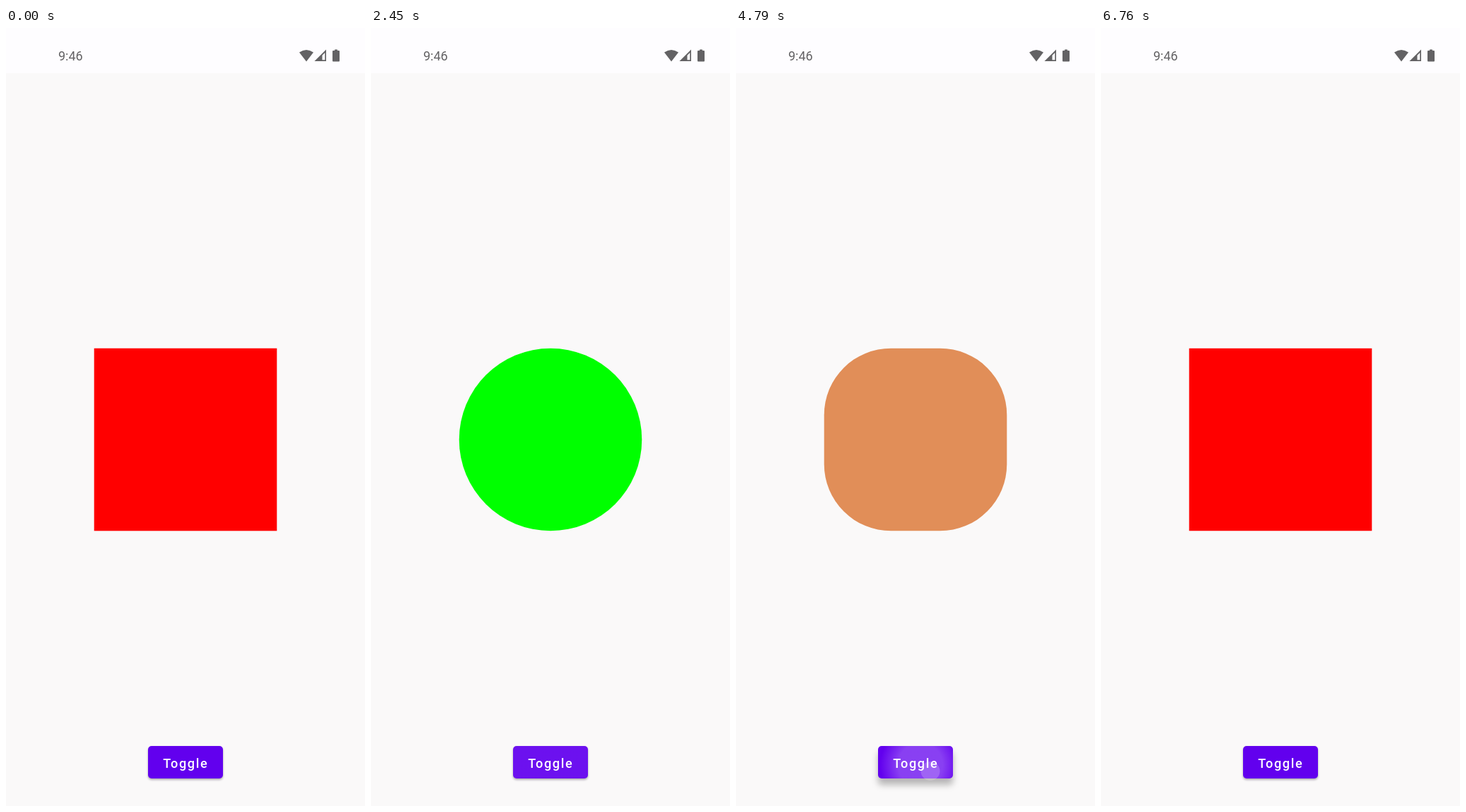
Write an HTML page that moves like this. It is 508x1102 px and loops after 7000 ms.

```html
<!DOCTYPE html>
<html lang="en">
<head>
<meta charset="utf-8">
<title>Shape toggle</title>
<style>
  html, body { margin: 0; width: 100%; height: 100%; overflow: hidden; background: #faf9f9; }
  svg { display: block; width: 508px; height: 1102px; font-family: Roboto, sans-serif; }
  #shadow { fill: #6200ee; }
</style>
</head>
<body>
<svg viewBox="0 0 508 1102">
  <defs>
    <radialGradient id="glow">
      <stop offset=".55" stop-color="#fff"/>
      <stop offset="1" stop-color="#fff" stop-opacity="0"/>
    </radialGradient>
    <clipPath id="buttonClip"><rect x="201" y="1017" width="106" height="46" rx="5"/></clipPath>
  </defs>
  <rect width="508" height="1102" fill="#faf9f9"/>
  <rect width="508" height="64" fill="#fefdff"/>

  <g fill="#636264">
    <text x="74" y="46" font-size="18">9:46</text>
    <path d="M415 34.6Q425 27.400 435 34.600L425 47.400Z"/>
    <path fill-rule="evenodd" d="M453 30.500V47H436.500ZM451.300 35V45.300H447.500V38.800Z"/>
    <path d="M465 30.500h4v1.500h2q1 0 1 1v13.500q0 1-1 1h-8q-1 0-1-1v-13.500q0-1 1-1h2z"/>
  </g>

  <rect id="shape" x="124.700" y="453.700" width="258.600" height="258.600"/>

  <rect id="shadow" x="201" y="1017" width="106" height="46" rx="5"/>
  <g clip-path="url(#buttonClip)"><circle id="ripple" fill="url(#glow)"/></g>
  <text x="222.300" y="1047.500" font-size="18.100" font-weight="500" letter-spacing="1.620" fill="#fff">Toggle</text>
  <circle id="touch" cx="275" cy="1052.500" r="13.500" fill="#fff"/>
</svg>
<script>
const LOOP = 7000, STEP = 30, SIZE = 258.6;
const RED = [.628, .2249, .1258], GREEN = [.8664, -.2339, .1795];   // Oklab

// Each tap toggles the shape on release; phase aligns the screen refresh.
const taps = [
  { press: 1780, release: 2063, phase: 20 },
  { press: 2960, release: 3383, phase: 0 },
  { press: 4490, release: 4757, phase: 20 },
  { press: 5685, release: 5923, phase: 0 }
];

const $ = id => document.getElementById(id);
const clamp = (v, lo = 0, hi = 1) => Math.min(hi, Math.max(lo, v));
const lerp = (a, b, t) => a + (b - a) * t;
const set = (id, attrs) => {
  for (const name in attrs) $(id).setAttribute(name, attrs[name]);
};

// Critically damped spring, stiffness 1500.
function spring(ms) {
  const u = Math.sqrt(1500) * Math.max(0, ms) / 1000;
  return 1 - (1 + u) * Math.exp(-u);
}

function encode(v) {
  v = clamp(v);
  return 255 * (v <= .0031308 ? 12.92 * v : 1.055 * v ** (1 / 2.4) - .055);
}

function mixColor(t) {
  const [L, a, b] = RED.map((v, i) => lerp(v, GREEN[i], t));
  const l = (L + .3963 * a + .2158 * b) ** 3;
  const m = (L - .1056 * a - .0639 * b) ** 3;
  const s = (L - .0895 * a - 1.2915 * b) ** 3;
  const r = encode(4.0767 * l - 3.3077 * m + .231 * s);
  const g = encode(-1.2684 * l + 2.6098 * m - .3413 * s);
  const blue = 88 * clamp(10 * t * (1 - t));   // pastel tint between the two ends
  return `rgb(${[r, g, blue].map(Math.round)})`;
}

function drawShape(now, index) {
  let t = 0;
  if (index >= 0) {
    const { release, phase } = taps[index];
    const frame = Math.floor((now - phase) / STEP) * STEP + phase;
    const progress = spring(frame - release);
    // The previous toggle has settled, so this one starts from a full end.
    t = index % 2 ? 1 - progress : progress;
  }
  set('shape', { rx: SIZE * Math.min(t, .5), fill: mixColor(t) });
}

function drawButton(now, tap) {
  const age = tap ? now - tap.press : 0;
  const since = tap ? now - tap.release : 1e4;

  const move = clamp(age / 450);
  const fade = 1 - clamp((since - 120) / 550);
  set('ripple', {
    cx: lerp(275, 254, move),
    cy: lerp(1052, 1040, move),
    r: age < 450 ? .19 * age : 140,
    opacity: .25 * clamp(age / 75) * fade * fade
  });

  set('touch', { opacity: .25 * clamp(age / 40) * clamp(1 - since / 150) });

  const lift = clamp(age / 120) * (1 - clamp((since - 40) / 150));
  const y = lerp(2, 9, lift), blur = lerp(1.5, 5, lift);
  $('shadow').style.filter =
    `drop-shadow(0 ${y}px ${blur}px rgba(0,0,0,${lerp(.3, .27, lift)}))`;
}

function draw(time) {
  const now = time % LOOP;
  drawShape(now, taps.findLastIndex(tap => now >= tap.release));
  drawButton(now, taps.findLast(tap => now >= tap.press));
  requestAnimationFrame(draw);
}
draw(performance.now());
</script>
</body>
</html>
```
